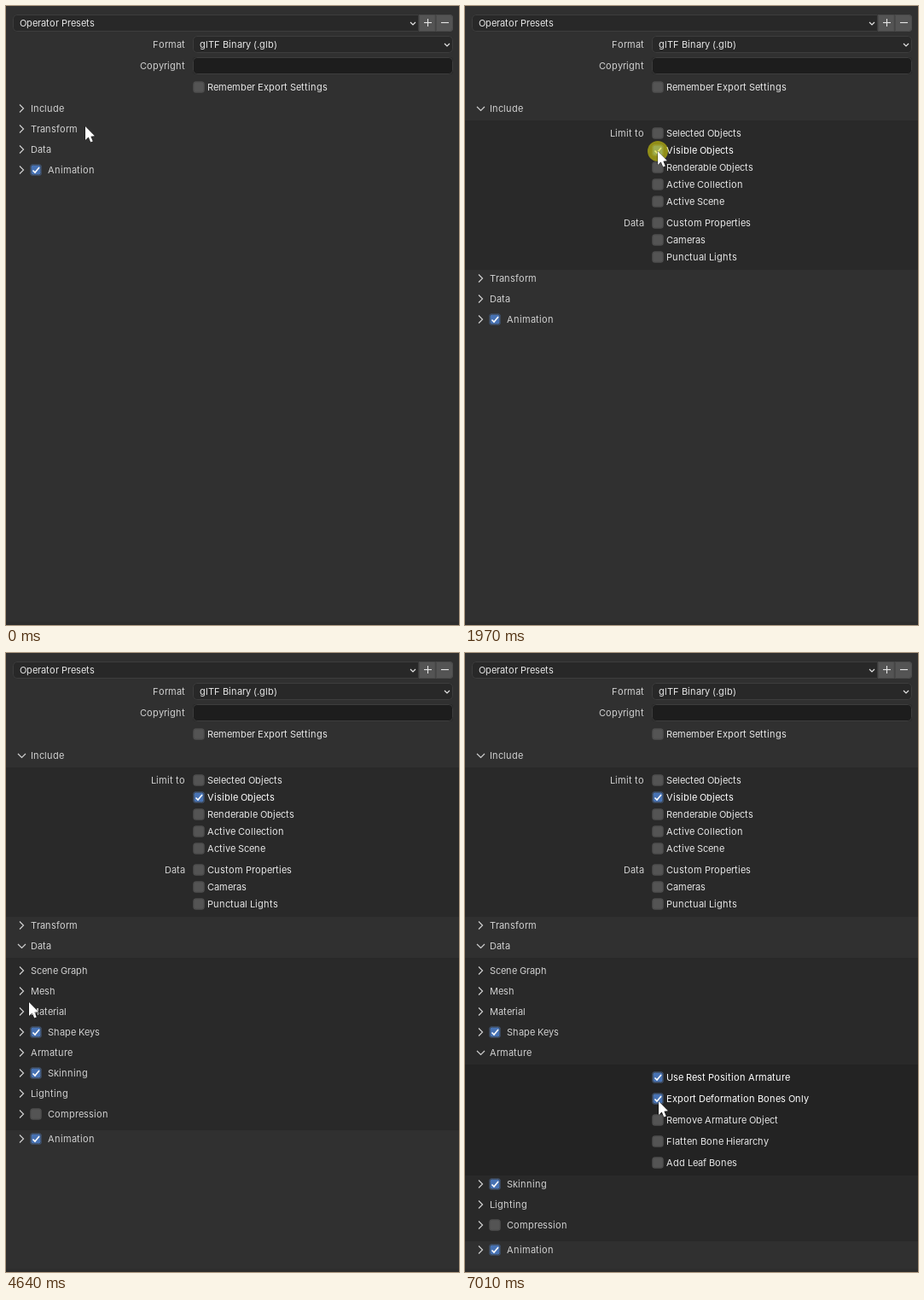
These frames come from a looping animation (531x725 px, 7750 ms). An HTML page with a canvas:

```html
<!DOCTYPE html>
<html lang="en">
<head>
<meta charset="utf-8">
<title>Export settings</title>
<style>
  html, body { margin: 0; width: 100%; height: 100%; overflow: hidden; background: #303030; }
  canvas { display: block; }
</style>
</head>
<body>
<canvas id="stage" width="531" height="725"></canvas>
<script>
const ctx = document.getElementById('stage').getContext('2d');
const LOOP = 7750, STEP = 70;
const LABEL = '#d0d0d0', TEXT = '#e6e6e6', WHITE = '#fff';
const FIELD = '#282828', BUTTON = '#545454', BORDER = '#3d3d3d', BLUE = '#4772b3';

// Pointer strokes: [time, x, y]
const strokes = [
  [[10, 93, 141], [390, 16, 117]],
  [[810, 16, 117], [1370, 206, 163], [1500, 222, 168], [1640, 226, 170]],
  [[2360, 226, 170], [3200, 65, 355], [3550, 20, 350], [3760, 15, 346]],
  [[4290, 15, 346], [4640, 27, 409], [4850, 36, 458], [5060, 29, 482], [5270, 23, 473]],
  [[5840, 23, 473], [6260, 191, 528], [6330, 204, 532], [6670, 227, 525]],
];
const clicks = [[610, 740], [1970, 2100], [3960, 4090], [5580, 5710], [6870, 7010]];

// Hermite curve through the keys, at rest at both ends
function along(keys, t, axis) {
  const last = keys.length - 1;
  if (t <= keys[0][0]) return keys[0][axis];
  if (t >= keys[last][0]) return keys[last][axis];
  const i = keys.findIndex(key => key[0] > t) - 1;
  const slope = k => k <= 0 || k >= last ? 0 :
    (keys[k + 1][axis] - keys[k - 1][axis]) / (keys[k + 1][0] - keys[k - 1][0]);
  const a = keys[i], b = keys[i + 1], span = b[0] - a[0], u = (t - a[0]) / span;
  return a[axis] + (b[axis] - a[axis]) * u * u * (3 - 2 * u)
    + span * u * (1 - u) * (slope(i) * (1 - u) - slope(i + 1) * u);
}

function pointerAt(t) {
  const keys = strokes.filter(s => s[0][0] <= t).pop() || strokes[0];
  const start = keys[0][0];
  const held = start + Math.floor((t - start) / STEP) * STEP;
  return { x: Math.round(along(keys, held, 1)), y: Math.round(along(keys, held, 2)) };
}

// Interface text sits on whole pixels, so every advance is rounded
const advances = {};
function advance(ch) {
  return advances[ch] ??= Math.round(ctx.measureText(ch).width + 0.03);
}

function text(str, x, y, color = LABEL) {
  ctx.fillStyle = color;
  for (const ch of str) {
    ctx.fillText(ch, x, y + 4);
    x += advance(ch);
  }
}

function textRight(str, x, y) {
  text(str, x - [...str].reduce((sum, ch) => sum + advance(ch), 0), y);
}

function box(x, y, w, h, radius, fill, border) {
  ctx.beginPath();
  ctx.roundRect(x, y, w, h, radius);
  ctx.fillStyle = fill;
  ctx.fill();
  if (!border) return;
  ctx.beginPath();
  ctx.roundRect(x + 0.5, y + 0.5, w - 1, h - 1, radius);
  ctx.strokeStyle = border;
  ctx.lineWidth = 1;
  ctx.stroke();
}

function line(points, color, width) {
  ctx.beginPath();
  points.forEach(([x, y]) => ctx.lineTo(x, y));
  ctx.strokeStyle = color;
  ctx.lineWidth = width;
  ctx.stroke();
}

function backdrop(top, bottom, color) {
  ctx.fillStyle = color;
  ctx.fillRect(0, top, 531, bottom - top);
}

function dropArrow(x, y) {
  line([[x - 3, y - 1], [x, y + 2], [x + 3, y - 1]], TEXT, 1.2);
}

function checkbox(x, y, checked, hover) {
  box(x - 6.5, y - 6.5, 13, 13, 2.5, checked ? BLUE : hover ? '#656565' : BUTTON, checked ? BORDER : '#4a4a4a');
  if (checked) line([[x - 3.5, y + 0.5], [x - 1, y + 3], [x + 4, y - 3]], WHITE, 1.6);
}

function option(label, y, checked, pointer) {
  const hover = pointer.x >= 219 && Math.abs(pointer.y - y) <= 10;
  checkbox(226, y, checked, hover);
  text(label, 236, y, checked || hover ? WHITE : TEXT);
}

function header(label, y, open, checked) {
  line(open ? [[14, y - 2], [18.5, y + 2.5], [23, y - 2]]
            : [[16, y - 4.5], [20.5, y], [16, y + 4.5]], LABEL, 1.2);
  const hasBox = checked !== undefined;
  if (hasBox) checkbox(35, y, checked);
  text(label, hasBox ? 49 : 29, y);
}

function drawTop(pointer) {
  box(8, 10, 476, 20, [4, 0, 0, 4], FIELD, BORDER);
  text('Operator Presets', 16, 20, TEXT);
  dropArrow(477, 20);
  box(484, 10, 19.5, 20, 0, BUTTON, '#4a4a4a');
  box(504, 10, 20, 20, [0, 4, 4, 0], BUTTON, '#4a4a4a');
  line([[490, 19.5], [499, 19.5]], TEXT, 1.1);
  line([[494.5, 15], [494.5, 24]], TEXT, 1.1);
  line([[510, 19.5], [519, 19.5]], TEXT, 1.1);

  textRight('Format', 210, 45);
  box(219, 35, 305, 20, 4, FIELD, BORDER);
  text('glTF Binary (.glb)', 227, 45, TEXT);
  dropArrow(517, 45);
  textRight('Copyright', 210, 70);
  box(219, 60, 305, 20, 4, '#1d1d1d', BORDER);
  option('Remember Export Settings', 95, false, pointer);
}

function drawInclude(t, pointer) {
  backdrop(134, 309, '#292929');
  textRight('Limit to', 210, 149);
  ['Selected Objects', 'Visible Objects', 'Renderable Objects', 'Active Collection', 'Active Scene']
    .forEach((label, i) => option(label, 149 + 20 * i, i === 1 && t >= 1970, pointer));
  textRight('Data', 210, 254);
  ['Custom Properties', 'Cameras', 'Punctual Lights']
    .forEach((label, i) => option(label, 254 + 20 * i, false, pointer));
}

function drawData(t, pointer) {
  const armatureOpen = t >= 5580, shift = armatureOpen ? 130 : 0;
  backdrop(357, 559 + shift, '#292929');
  header('Scene Graph', 372);
  header('Mesh', 396);
  header('Material', 420);
  header('Shape Keys', 444, false, true);
  header('Armature', 468, armatureOpen);
  if (armatureOpen) {
    backdrop(482, 612, '#232323');
    ['Use Rest Position Armature', 'Export Deformation Bones Only', 'Remove Armature Object',
     'Flatten Bone Hierarchy', 'Add Leaf Bones'].forEach((label, i) =>
      option(label, 497 + 25 * i, i === 0 || (i === 1 && t >= 6940), pointer));
  }
  header('Skinning', 492 + shift, false, true);
  header('Lighting', 516 + shift);
  header('Compression', 540 + shift, false, false);
  return 569 + shift;
}

function drawPointer(t, { x, y }) {
  if (clicks.some(([from, to]) => t >= from && t < to)) {
    ctx.beginPath();
    ctx.arc(x, y, 12, 0, 2 * Math.PI);
    ctx.fillStyle = 'rgba(220, 215, 10, 0.58)';
    ctx.fill();
  }
  ctx.beginPath();
  [[0, 0], [0, 16], [3.7, 12.6], [6.2, 18.6], [8.8, 17.5], [6.4, 11.7], [11, 11.3]]
    .forEach(([dx, dy]) => ctx.lineTo(x + dx, y + dy));
  ctx.closePath();
  ctx.strokeStyle = 'rgba(0, 0, 0, 0.6)';
  ctx.lineWidth = 1;
  ctx.stroke();
  ctx.fillStyle = WHITE;
  ctx.fill();
}

function draw(now) {
  const t = now % LOOP;
  const pointer = pointerAt(t);
  const includeOpen = t >= 610, dataOpen = t >= 3960;
  const shift = includeOpen ? 175 : 0;

  ctx.font = '11px Inter, sans-serif';
  backdrop(0, 725, '#303030');
  backdrop(721, 725, '#2d2d2d');
  drawTop(pointer);
  header('Include', 120, includeOpen);
  if (includeOpen) drawInclude(t, pointer);
  header('Transform', 144 + shift);
  header('Data', 168 + shift, dataOpen);
  const animationY = dataOpen ? drawData(t, pointer) : 192 + shift;
  header('Animation', animationY, false, true);
  drawPointer(t, pointer);
}

const begin = performance.now();
function tick() {
  draw(performance.now() - begin);
  requestAnimationFrame(tick);
}
tick();
</script>
</body>
</html>
```
